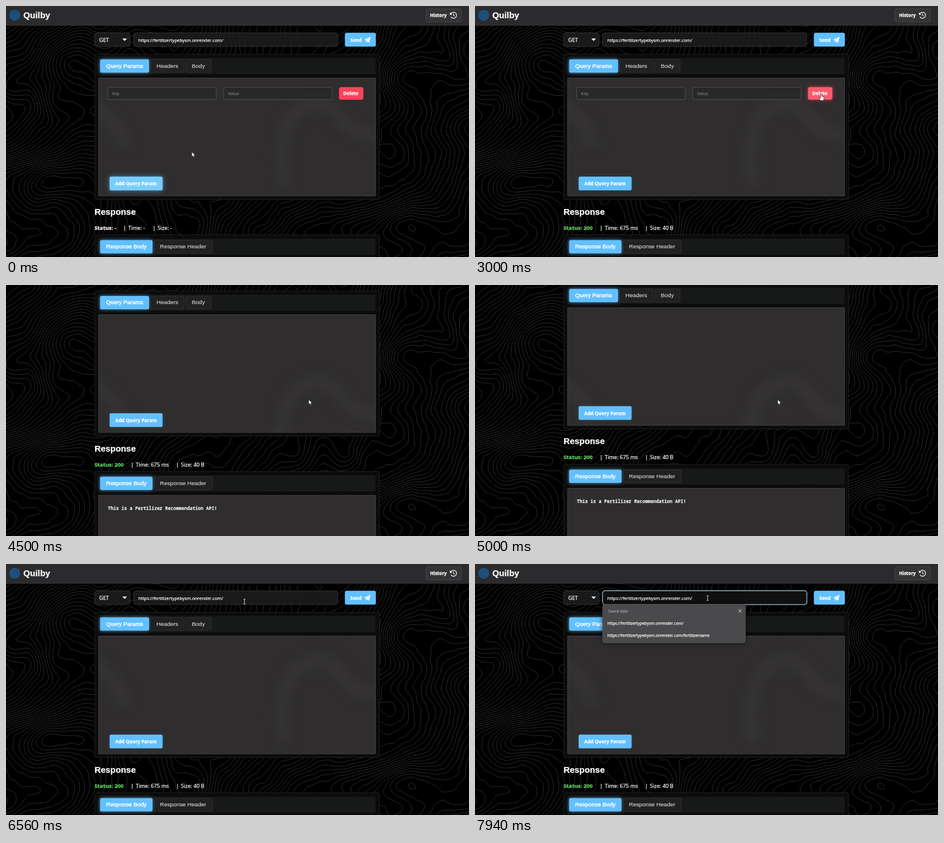
Write an HTML page with a canvas that moves like this. It is 800 by 434 pixels and loops after 8000 ms.

```html
<!DOCTYPE html>
<html lang="en">
<head>
<meta charset="utf-8">
<title>Quilby</title>
<style>
html, body { margin: 0; width: 100%; height: 100%; overflow: hidden; background: #000; }
canvas { display: block; width: 100%; height: 100%; }
</style>
</head>
<body>
<canvas id="stage"></canvas>
<script>
const W = 800, H = 434, LOOP = 8000;
const SANS = '"Open Sans", "Noto Sans", sans-serif';
const ARIAL = '"Liberation Sans", Arial, sans-serif';
const MONO = '"Noto Sans Mono", "DejaVu Sans Mono", monospace';
const BLUE = '#62c0ff', WHITE = '#fff', GLOW = 'rgba(98,192,255,.6)';
const URL_TEXT = 'https://fertilizertypebysm.onrender.com/';
const dpr = window.devicePixelRatio || 1;

function makeCanvas(el = document.createElement('canvas')) {
  el.width = W * dpr;
  el.height = H * dpr;
  const c = el.getContext('2d');
  c.scale(dpr, dpr);
  return c;
}
const ctx = makeCanvas(document.getElementById('stage'));

const clamp = v => Math.min(1, Math.max(0, v));
const ease = v => { v = clamp(v); return v * v * (3 - 2 * v); };
const mix = (a, b, k) => a + (b - a) * k;

// Topographic backdrop
function hash(x, y) {
  const s = Math.sin(x * 127.1 + y * 311.7 + 17.3) * 43758.5453;
  return s - Math.floor(s);
}
function noise(x, y) {
  const i = Math.floor(x), j = Math.floor(y), u = ease(x - i), v = ease(y - j);
  return mix(mix(hash(i, j), hash(i + 1, j), u), mix(hash(i, j + 1), hash(i + 1, j + 1), u), v);
}
const hills = [[75, 306, 38, .5], [8, 140, 26, .3], [115, 95, 45, .35],
  [705, 125, 44, .4], [690, 365, 42, .4], [790, 50, 40, .3]];
function height(x, y) {
  let h = x * .006 + y * .005;
  h += noise(x / 100, y / 100) * 1.2 + noise(x / 42 + 9, y / 42) * .32 + noise(x / 14, y / 14 + 5) * .045;
  for (const [hx, hy, r, a] of hills) h += a * Math.exp(-((x - hx) ** 2 + (y - hy) ** 2) / (r * r));
  return h;
}
function contours() {
  const c = makeCanvas(), G = 2.5, STEP = .09;
  c.fillStyle = '#000';
  c.fillRect(0, 0, W, H);
  c.beginPath();
  for (let y = 0; y < H; y += G) for (let x = 0; x < W; x += G) {
    const p = [[x, y], [x + G, y], [x + G, y + G], [x, y + G]];
    const h = p.map(q => height(...q));
    const top = Math.max(...h);
    for (let l = Math.ceil(Math.min(...h) / STEP) * STEP; l < top; l += STEP) {
      const cuts = [];
      for (let i = 0; i < 4; i++) {
        const j = (i + 1) % 4;
        if (h[i] < l === h[j] < l) continue;
        const k = (l - h[i]) / (h[j] - h[i]);
        cuts.push([mix(p[i][0], p[j][0], k), mix(p[i][1], p[j][1], k)]);
      }
      for (let i = 0; i + 1 < cuts.length; i += 2) {
        c.moveTo(...cuts[i]);
        c.lineTo(...cuts[i + 1]);
      }
    }
  }
  c.strokeStyle = '#333';
  c.lineWidth = .85;
  c.stroke();
  return c.canvas;
}

// Frosted glass seen through the content panels
function frosted() {
  const c = makeCanvas();
  c.fillStyle = '#2f2d2e';
  c.fillRect(0, 0, W, H);
  c.filter = `blur(${9 * dpr}px)`;
  c.strokeStyle = 'rgba(64,61,66,.4)';
  c.lineWidth = 24;
  c.beginPath();
  c.moveTo(480, 310);
  c.bezierCurveTo(470, 230, 480, 180, 530, 168);
  c.bezierCurveTo(580, 155, 570, 230, 650, 225);
  c.moveTo(150, 170);
  c.quadraticCurveTo(195, 200, 205, 245);
  c.stroke();
  return c.canvas;
}
const backdrop = contours(), glass = frosted();

// Drawing helpers
function box(x, y, w, h, r, fill, line, glow, blur = 7) {
  ctx.save();
  ctx.beginPath();
  ctx.roundRect(x, y, w, h, r);
  if (glow) { ctx.shadowColor = glow; ctx.shadowBlur = blur * dpr; }
  if (fill) { ctx.fillStyle = fill; ctx.fill(); }
  ctx.shadowColor = 'transparent';
  if (line) { ctx.strokeStyle = line; ctx.lineWidth = .8; ctx.stroke(); }
  ctx.restore();
}
// A hairline outline gives the letters a slightly stronger weight
function text(s, x, y, font, color = WHITE, weight = .25) {
  ctx.font = font;
  ctx.fillStyle = ctx.strokeStyle = color;
  ctx.lineWidth = weight;
  ctx.lineJoin = 'round';
  ctx.fillText(s, x, y);
  ctx.strokeText(s, x, y);
}
function poly(points, fill, line) {
  ctx.beginPath();
  points.forEach(p => ctx.lineTo(...p));
  ctx.closePath();
  ctx.fillStyle = fill;
  ctx.fill();
  if (line) { ctx.strokeStyle = line; ctx.lineWidth = .7; ctx.stroke(); }
}
function stroke(points, color, width) {
  ctx.beginPath();
  points.forEach(p => ctx.lineTo(...p));
  ctx.strokeStyle = color;
  ctx.lineWidth = width;
  ctx.stroke();
}

// Timeline
const RESPONSE_AT = 2310, REMOVED_AT = 3380, FOCUS_AT = 7190;
const path = [[0, 321, 252], [130, 321, 252], [880, 620, 56], [2310, 620, 56], [3000, 598, 152],
  [3810, 598, 152], [4000, 523, 198], [6380, 523, 198], [6560, 412, 65], [7130, 402, 59], [LOOP, 402, 59]];

function pointer(t) {
  const i = path.findIndex(p => p[0] > t), [t0, x0, y0] = path[i - 1], [t1, x1, y1] = path[i];
  const k = ease((t - t0) / (t1 - t0));
  return [mix(x0, x1, k), mix(y0, y1, k)];
}
function scrollAt(t) {
  if (t < 4190) return 0;
  const down = 86.4 * (1 - Math.exp(-(t - 4143) / 190));
  return down * (1 - ease((t - 5770) / 290));
}
const inside = ([px, py], x, y, w, h) => px >= x && px <= x + w && py >= y && py <= y + h;

// Page parts
function header() {
  box(0, -2, W, 36, 0, '#2b2a2c', null, 'rgba(0,0,0,.8)', 6);
  ctx.fillStyle = '#3a393b';
  ctx.fillRect(0, 33.4, W, .6);
  ctx.beginPath();
  ctx.arc(15, 16, 9.5, 0, 7);
  ctx.fillStyle = '#1d4f7c';
  ctx.fill();
  text('Quilby', 30, 21, `bold 14.9px ${ARIAL}`);
  box(725.5, 5, 61.5, 22.5, 3, '#343335', '#4b494d');
  text('History', 732.7, 19.2, `bold 7.9px ${SANS}`);
  ctx.beginPath();
  ctx.arc(773.3, 16, 5.2, -2.7, 2.6);
  ctx.strokeStyle = WHITE;
  ctx.lineWidth = 1.2;
  ctx.stroke();
  stroke([[773.3, 13], [773.3, 16.3], [775.4, 17.6]], WHITE, 1.1);
  poly([[767, 11], [767, 15.2], [771, 15.2]], WHITE);
}

function requestBar(t, mouse) {
  const focus = t >= FOCUS_AT;
  box(153.4, 46.4, 61, 23.6, 4, 'rgba(28,28,29,.9)', '#3b3b3c');
  text('GET', 161, 62, `9.2px ${SANS}`);
  poly([[201, 56.3], [209, 56.3], [205, 60.6]], WHITE);
  box(220.6, 46.4, 352.6, 23.6, 4, focus ? '#101011' : 'rgba(28,28,29,.9)', focus ? null : '#3b3b3c');
  if (focus) {
    box(220.6, 46.4, 352.6, 23.6, 4, null, '#d8e9f8');
    box(220, 45.8, 353.8, 24.8, 4.5, null, '#7aa6c8');
  }
  text(URL_TEXT, 228.7, 61.6, `7.7px ${SANS}`);
  const hot = inside(mouse, 585, 46, 54, 24);
  box(585.5, 46.2, 53.5, 24, 3, hot ? '#70c6ff' : BLUE, null, hot && GLOW, 9);
  text('Send', 595, 61.7, `bold 8px ${SANS}`);
  poly([[619, 58.2], [630, 53], [627.4, 63.6], [624.2, 61.2], [622.6, 63.4], [622, 60]], WHITE);
  stroke([[622.2, 60], [628, 55]], BLUE, .7);
}

function tabs(y, items) {
  box(160, y, 478.5, 28, 2, '#171918');
  items.forEach(([label, x, w, tx], i) => {
    if (i) box(x, y + 2.4, w, 22.4, 2, '#212122', '#353536');
    else box(x, y + 2.2, w, 23, 2.5, BLUE, null, GLOW);
    text(label, tx, y + 16.6, `9.92px ${ARIAL}`, i ? '#d2d2d2' : WHITE, i ? .15 : .45);
  });
}

function panel(y, h, bodyY, bodyH, scroll) {
  box(153.4, y, 492, h, 2, 'rgba(12,12,12,.93)', '#262627');
  ctx.save();
  ctx.beginPath();
  ctx.rect(160, bodyY, 478.5, bodyH);
  ctx.clip();
  ctx.drawImage(glass, 0, scroll, W, H);
  ctx.restore();
  box(160, bodyY, 478.5, bodyH, 0, null, '#4c4b4d');
}

function queryPanel(t, mouse, scroll) {
  panel(83.4, 251, 124.6, 203.6, scroll);
  tabs(90, [['Query Params', 162.6, 84.6, 173], ['Headers', 250, 58, 260], ['Body', 311, 43.2, 321]]);
  if (t < REMOVED_AT) {
    for (const [x, label] of [[175.8, 'Key'], [376, 'Value']]) {
      box(x, 140.4, 187.4, 21.2, 3, 'rgba(40,39,41,.8)', '#5a585b');
      text(label, x + 7.4, 154.4, `7.7px ${SANS}`, '#858388', .1);
    }
    const hot = inside(mouse, 575, 140, 42, 22);
    box(575.4, 140.2, 42, 21.8, 3, hot ? '#ff5a70' : '#ff425c', null, hot && 'rgba(255,66,92,.6)');
    text('Delete', 582.8, 154.2, `bold 8px ${SANS}`);
  }
  const fade = 1 - clamp((t - 130) / 250);
  box(179, 295, 91.6, 23.8, 2.5, `rgb(${mix(98, 120, fade)},${mix(192, 205, fade)},255)`, null,
    `rgba(98,192,255,${.1 + .55 * fade})`, 9);
  text('Add Query Param', 188.8, 310, `bold 8.17px ${SANS}`);
}

function statusRow(t) {
  const bold = `bold 9.25px ${SANS}`, plain = `9.22px ${SANS}`, y = 386.8;
  const put = (status, color, a, time, b, size) => {
    text(status, 153, y, bold, color);
    text('|', a, y, plain);
    text('Time: ' + time, a + 8.7, y, plain);
    text('|', b, y, plain);
    text('Size: ' + size, b + 8.4, y, plain);
  };
  if (t < 1630) put('Status: -', WHITE, 202.6, '-', 253.6, '-');
  else if (t < RESPONSE_AT) put('Status: Loading...', WHITE, 244, 'Calculating...', 345.4, 'Calculating...');
  else put('Status: 200', '#62d663', 215.6, '675 ms', 293.8, '40 B');
}

function responsePanel(t, scroll) {
  text('Response', 153, 360.8, `bold 14.9px ${ARIAL}`);
  statusRow(t);
  panel(395.6, 260, 437, 204, scroll);
  tabs(402.6, [['Response Body', 162.6, 90.6, 173], ['Response Header', 256.4, 100, 266]]);
  if (t >= RESPONSE_AT) {
    text('This is a Fertilizer Recommendation API!', 176, 462, `bold 7.87px ${MONO}`, WHITE, .1);
  }
}

function suggestions() {
  box(220.6, 69.8, 246.6, 66.4, 4, '#4a494b', '#5b5a5c', 'rgba(0,0,0,.7)', 8);
  text('Saved data', 230, 83.8, `6.65px ${SANS}`, '#b4b3b5', .1);
  stroke([[455.2, 78.4], [460.6, 83.8]], '#ddd', 1);
  stroke([[460.6, 78.4], [455.2, 83.8]], '#ddd', 1);
  text(URL_TEXT, 228.8, 105.4, `6.9px ${SANS}`);
  text(URL_TEXT + 'fertilizername', 228.8, 126.2, `6.9px ${SANS}`);
}

function cursor(t, mouse) {
  ctx.save();
  ctx.translate(...mouse);
  const overButton = inside(mouse, 585, 46, 54, 24) ||
    (t < REMOVED_AT && inside(mouse, 575, 140, 42, 22));
  if (overButton) {
    poly([[-1, 0], [0, -1], [1.2, 0], [1.2, 4], [4.6, 5], [5, 8], [4, 11.5], [-1, 11.5], [-3.6, 7.2], [-2.6, 6.4], [-1, 7.6]],
      WHITE, '#222');
  } else if (inside(mouse, 220, 46, 353, 24) && t > 6000) {
    stroke([[-1.8, -4], [1.8, -4]], '#ddd', .9);
    stroke([[0, -4], [0, 4]], '#ddd', .9);
    stroke([[-1.8, 4], [1.8, 4]], '#ddd', .9);
  } else {
    poly([[0, 0], [0, 8.6], [2, 6.9], [3.4, 10], [4.7, 9.4], [3.4, 6.4], [6, 6.2]], WHITE, '#111');
  }
  ctx.restore();
}

function draw(t) {
  const mouse = pointer(t), scroll = scrollAt(t);
  ctx.drawImage(backdrop, 0, 0, W, H);
  ctx.save();
  ctx.translate(0, -scroll);
  header();
  requestBar(t, mouse);
  queryPanel(t, mouse, scroll);
  responsePanel(t, scroll);
  if (t >= FOCUS_AT) suggestions();
  ctx.restore();
  cursor(t, mouse);
}

const start = performance.now();
function tick() {
  draw((performance.now() - start) % LOOP);
  requestAnimationFrame(tick);
}
tick();
</script>
</body>
</html>
```
